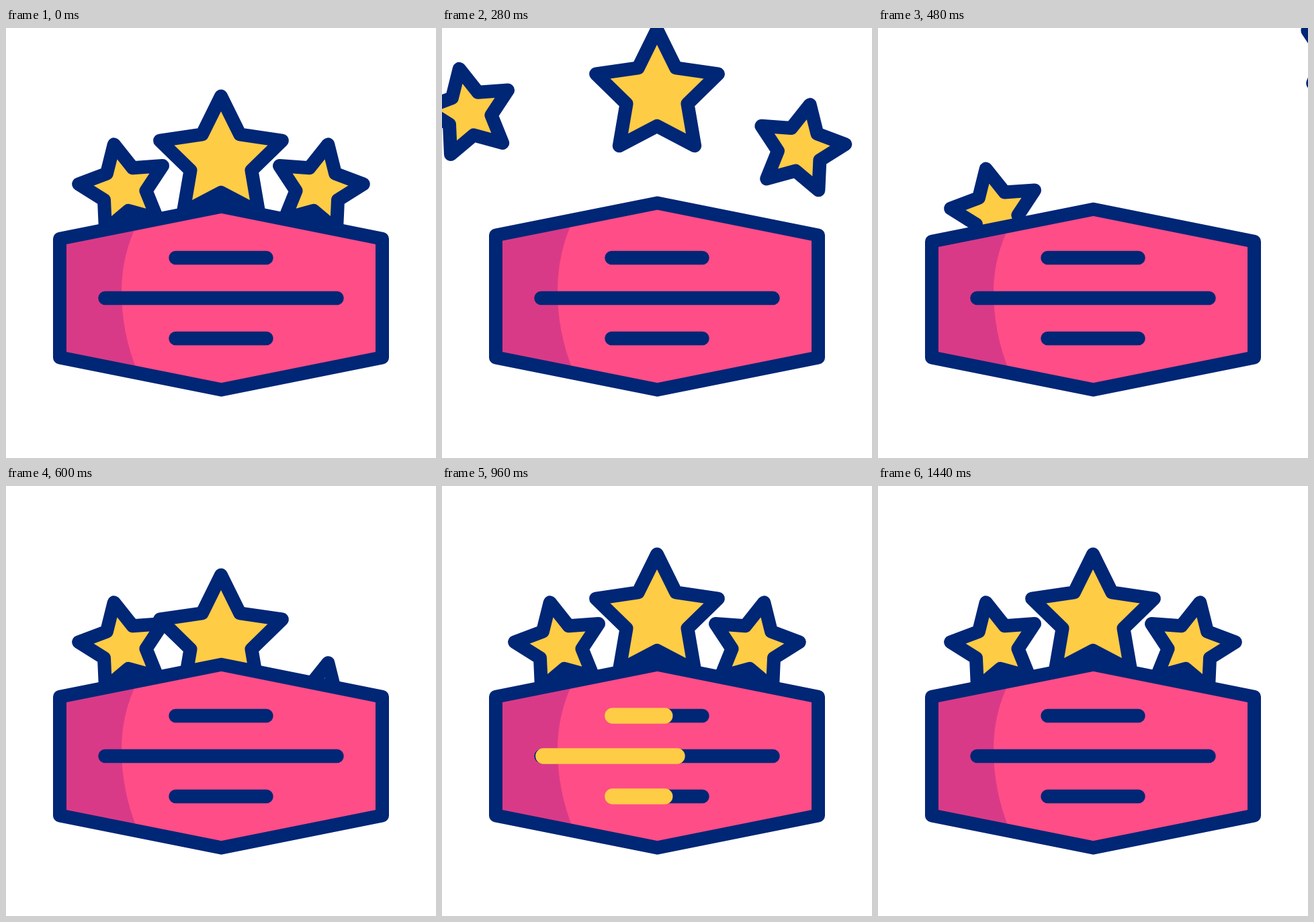
Write an HTML page with a canvas that moves like this. It is 640 px wide and 640 px high and loops after 1480 ms.

```html
<!DOCTYPE html>
<html lang="en">
<head>
<meta charset="utf-8">
<title>Star sign</title>
<style>
  html, body { margin: 0; width: 100%; height: 100%; overflow: hidden; background: #fff; }
  canvas { display: block; width: 100vmin; height: 100vmin; }
</style>
</head>
<body>
<canvas id="stage" width="640" height="640"></canvas>
<script>
const ctx = document.getElementById('stage').getContext('2d');
const LOOP = 1480;
const NAVY = '#002676', YELLOW = '#ffcc45', PINK = '#ff4d87', SHADE = '#d93a87';

// Each star accelerates along `out`, then rises from behind the sign.
// `out` is the shift reached at 200 ms.
const STARS = [
  { x: 175, y: 239, r: 67.2, tilt: -12.3, out: [-60, -50], start: 40, back: 360, depth: 140 },
  { x: 320, y: 197.1, r: 95.6, tilt: 0, out: [0, -46], start: 29, back: 465, depth: 198 },
  { x: 465, y: 239, r: 67.2, tilt: 12.3, out: [30, -26], start: 43, back: 525, depth: 144 }
];
const RISE = 180;

const BARS = [
  { y: 342, from: 252.5, to: 387.5 },
  { y: 402, from: 147.5, to: 492.5 },
  { y: 462, from: 252.5, to: 387.5 }
];

const clamp = v => Math.min(1, Math.max(0, v));
const mix = (a, b, p) => a + (b - a) * p;
const ease = (t, start, duration) => {
  const x = clamp((t - start) / duration);
  return x * x * (3 - 2 * x);
};

function starShift(star, t) {
  if (t >= star.back) return [0, star.depth * (1 - ease(t, star.back, RISE))];
  const u = Math.max(0, t - star.start) / (200 - star.start);
  return star.out.map(v => v * u * u);
}

function lidShift(t) {
  if (t < 200) return mix(0, -12.5, ease(t, 0, 200));
  if (t < 400) return mix(-12.5, 8, ease(t, 200, 200));
  return mix(8, 0, ease(t, 400, 160));
}

function outline(color, width) {
  ctx.strokeStyle = color;
  ctx.lineWidth = width;
  ctx.stroke();
}

function drawStar(star, t) {
  const [dx, dy] = starShift(star, t);
  ctx.beginPath();
  for (let i = 0; i < 10; i++) {
    const angle = (star.tilt + i * 36) * Math.PI / 180;
    const r = i % 2 ? star.r / 2 : star.r;
    ctx.lineTo(star.x + dx + r * Math.sin(angle), star.y + dy - r * Math.cos(angle));
  }
  ctx.closePath();
  ctx.fillStyle = YELLOW;
  ctx.fill();
  outline(NAVY, 20);
}

function drawSign(lid) {
  const sign = new Path2D();
  [[80, 313.8 + lid], [320.5, 265.8 + lid], [560, 313.8 + lid],
   [560, 490.4], [320.5, 538.4], [80, 490.4]].forEach(p => sign.lineTo(...p));
  sign.closePath();
  ctx.fillStyle = PINK;
  ctx.fill(sign);

  ctx.save();
  ctx.clip(sign);
  ctx.beginPath();
  ctx.moveTo(80, 250);
  ctx.lineTo(196, 290 + lid);
  ctx.bezierCurveTo(180, 322 + lid, 172, 356 + lid / 2, 172, 392);
  ctx.bezierCurveTo(172, 431, 179, 471, 196, 512);
  ctx.lineTo(80, 540);
  ctx.fillStyle = SHADE;
  ctx.fill();
  ctx.restore();

  ctx.strokeStyle = NAVY;
  ctx.lineWidth = 20;
  ctx.stroke(sign);
}

function drawLine(x1, x2, y, color, width) {
  ctx.beginPath();
  ctx.moveTo(x1, y);
  ctx.lineTo(x2, y);
  outline(color, width);
}

function drawBars(t) {
  const head = ease(t, 720, 430);
  const tail = ease(t, 931, 496);
  for (const { y, from, to } of BARS) {
    drawLine(from, to, y, NAVY, 20.5);
    if (head > 0 && tail < 1) {
      drawLine(mix(from, to, tail), mix(from, to, head), y, YELLOW, 23.5);
    }
  }
}

function draw(t) {
  ctx.fillStyle = '#fff';
  ctx.fillRect(0, 0, 640, 640);
  ctx.lineJoin = ctx.lineCap = 'round';
  STARS.forEach(star => drawStar(star, t));
  drawSign(lidShift(t));
  drawBars(t);
}

const origin = performance.now();
function tick() {
  const t = (performance.now() - origin) % LOOP;
  draw(Math.floor(t / 40) * 40);
  requestAnimationFrame(tick);
}
tick();
</script>
</body>
</html>
```
